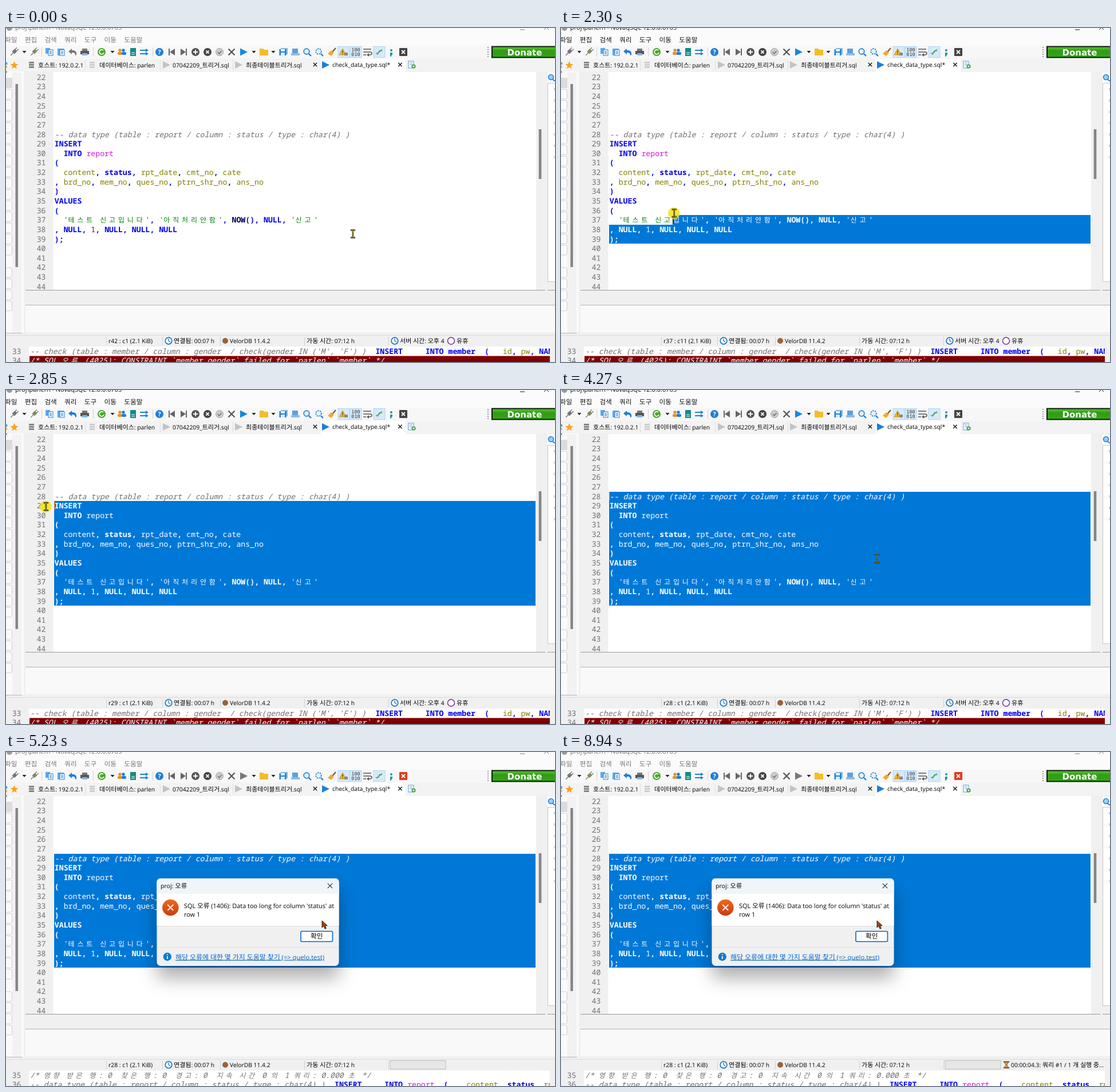
Animation, 959 px wide and 584 px high, one loop 9070 ms. Source, as an HTML page:

```html
<!DOCTYPE html>
<html lang="ko">
<head>
<meta charset="utf-8">
<title>SQL editor</title>
<style>
html, body { margin: 0; width: 100%; height: 100%; overflow: hidden; background: #f0f0f0; }
svg { display: block; width: 100%; height: 100%; }
text { white-space: pre; text-rendering: geometricPrecision; font-family: 'Open Sans', 'Noto Sans CJK KR', sans-serif; }
.code text { font: 13.23px 'Noto Sans Mono', 'Noto Sans CJK KR', monospace; }
.code text.ko { font: 12px 'Noto Sans CJK KR', sans-serif; letter-spacing: 4.84px; }
.code .com { fill: #707070; font-style: italic; }
.code .com.ko { font-style: italic; }
.code .str { fill: #008000; }
.code .kw { fill: #0000f0; font-weight: bold; }
.code .fn { fill: #000060; font-weight: bold; }
.code .tab { fill: #d818e0; }
.code .num { fill: #800080; }
.code .id { fill: #808000; }
.code .sym { fill: #0000f0; font-weight: 600; }
.code.white text { fill: #fff; }
.ko { font-family: 'Noto Sans CJK KR', sans-serif; }
</style>
</head>
<body>
<svg id="stage" viewBox="0 0 959 584" preserveAspectRatio="none"></svg>
<script>
const LOOP = 9070, CELL = 7.94, ROW = 16.63, LEFT = 84.8, TOP = 177.8;
const BLUE = '#1e7fd6', DARK = '#4a4a4a';
const esc = s => s.replace(/&/g, '&amp;').replace(/</g, '&lt;').replace(/>/g, '&gt;');
const isKo = s => /[가-힣]/.test(s);
const split = s => s.match(/[가-힣]+|[^가-힣]+/g) || [];

const rect = (x, y, w, h, fill, more = '') => `<rect x="${x}" y="${y}" width="${w}" height="${h}" fill="${fill}" ${more}/>`;
const circle = (x, y, r, fill, more = '') => `<circle cx="${x}" cy="${y}" r="${r}" fill="${fill}" ${more}/>`;
const fillPath = (d, fill, more = '') => `<path d="${d}" fill="${fill}" ${more}/>`;
const line = (d, color = DARK, w = 1, more = '') => `<path d="${d}" fill="none" stroke="${color}" stroke-width="${w}" ${more}/>`;
const cross = (x, y, r, color, w) => line(`M${x - r} ${y - r}l${2 * r} ${2 * r}m0 ${-2 * r}l${-2 * r} ${2 * r}`, color, w);
const spans = (s, size) => split(s).map(p => isKo(p)
  ? `<tspan class="ko" font-size="${(size * 1.07).toFixed(2)}">${p}</tspan>` : `<tspan>${esc(p)}</tspan>`).join('');
const label = (x, y, s, size = 10.3, more = '') => `<text x="${x}" y="${y}" font-size="${size}" ${more}>${spans(s, size)}</text>`;
const group = (id, body, more = '') => `<g id="${id}" ${more}>${body}</g>`;

// Code text on a fixed grid; Hangul takes two cells
const cells = s => [...s].reduce((n, c) => n + (isKo(c) ? 2 : 1), 0);
const TOKEN = /(--.*? \)(?=  |$)|\/\*.*\*\/)|('[^']*')|(\b(?:INSERT|INTO|VALUES|NULL|NAME|status|member)\b)|(\bNOW\b)|(\breport\b)|(\d+)|(\w+)|([^\w\s'])/g;
const KINDS = ['com', 'str', 'kw', 'fn', 'tab', 'num', 'id', 'sym'];
function codeLine(x, y, s) {
  let out = '';
  for (const m of s.matchAll(TOKEN)) {
    const kind = KINDS[m.slice(1).findIndex(v => v !== undefined)];
    let col = cells(s.slice(0, m.index));
    for (const part of split(m[0])) {
      out += `<text class="${kind}${isKo(part) ? ' ko' : ''}" x="${(x + col * CELL).toFixed(2)}" y="${y}">${esc(part)}</text>`;
      col += cells(part);
    }
  }
  return out;
}

const SQL = [
  '-- data type (table : report / column : status / type : char(4) )',
  'INSERT', '  INTO report', '(',
  '  content, status, rpt_date, cmt_no, cate',
  ', brd_no, mem_no, ques_no, ptrn_shr_no, ans_no',
  ')', 'VALUES', '(',
  "  '테스트 신고입니다', '아직처리안함', NOW(), NULL, '신고'",
  ', NULL, 1, NULL, NULL, NULL', ');'
];
const rowTop = n => TOP + (n - 28) * ROW;
const baseline = n => (rowTop(n) + 12.8).toFixed(2);
const codeBody = SQL.map((s, i) => codeLine(LEFT, baseline(i + 28), s)).join('');

function chrome() {
  let o = rect(0, 0, 959, 584, '#f0f0f0') + rect(0, 0, 959, 31, '#fbfbfb') + rect(0, 31, 959, 23, '#f7f7f7');
  o += group('menu', circle(6, 0, 5, '#9a9a9a') + label(16, 3, 'proj\\parlen\\ - NovaqSQL 12.0.0.6765', 11) +
    line('M898 3h8M940 3l4-4 4 4', 'currentColor') +
    ['파일', '편집', '검색', '쿼리', '도구', '이동', '도움말'].map((s, i) => label(-2 + i * 34.7, 25, s, 10.9)).join(''), 'fill="currentColor"');
  return o + toolbar() + tabs() + panels();
}

function toolbar() {
  const drop = x => fillPath(`M${x - 3.5} 40h7l-3.5 4z`, '#222');
  const plug = (x, c) => `<g transform="translate(${x} 42) rotate(45)">${rect(-3, -5, 6, 7, c, 'rx="1"')}${line('M-2 -5v-4M2 -5v-4M0 2v6', c, 1.5)}</g>`;
  const page = (x, y, c) => rect(x, y, 8, 10, '#fff', `stroke="${c}"`) + line(`M${x + 2} ${y + 3}h4m-4 2h4m-4 2h4`, c);
  const skip = (x, d) => fillPath(`M${x - 5 * d} 36v12l${9 * d} -6z`, '#666', `transform="rotate(180 ${x} 42)"`) + rect(x - 5 * d - 1, 36, 2, 12, '#666');
  const hi = x => rect(x - 10, 32.5, 20, 19, '#d6eafa', 'stroke="#b0d5f3"');
  const lens = (x, more = '') => circle(x - 1, 41, 4.8, '#e4f2fd', `stroke="${BLUE}" stroke-width="1.7" ${more}`) + line(`M${x + 3} 45l4 4`, BLUE, 2.4);
  let o = plug(14, '#70767c') + drop(32) + plug(49, '#7e8a62');
  o += rect(69, 35, 8, 10, '#5aa9ea') + page(74, 38, BLUE) + rect(90, 36, 11, 12, '#5aa9ea') + page(94, 38, BLUE);
  o += group('undo', fillPath('M109 41l6-5v3h3q6 1 5 8l-2 1q0-5-4-5h-2v3z', 'currentColor'));
  o += rect(133, 36, 9, 4, '#777') + rect(130, 40, 15, 6, '#555') + rect(133, 44, 9, 4, '#79b8ee');
  o += circle(167, 42, 7, '#4ca52c') + line('M170 39a4 4 0 1 0 1 4', '#fff', 1.6) + drop(186);
  o += circle(199, 39, 2.7, '#e29330') + rect(195, 42, 8, 5, '#e29330', 'rx="2"') + circle(205, 39, 2.7, BLUE) + rect(202, 42, 8, 5, BLUE, 'rx="2"');
  o += rect(217, 35, 10, 14, '#138c86') + line('M219 43h6m-6 3h6', '#fff') + line('M234 39h12M234 45h12', BLUE, 2) + fillPath('M244 36l5 3-5 3zM244 42l5 3-5 3z', BLUE);
  o += circle(268, 42, 7, BLUE) + label(265.6, 46, '?', 11, 'fill="#fff" font-weight="bold"') + skip(290, 1) + skip(310, -1);
  o += circle(331, 42, 7, '#555') + line('M327 42h8M331 38v8', '#fff', 1.8) + circle(352, 42, 7, '#444') + cross(352, 42, 2.6, '#fff', 1.8);
  o += circle(373, 42, 6.6, '#ccc', 'stroke="#aaa"') + line('M370 42l2.5 3 4-5', '#777', 1.6) + cross(394, 42, 5.5, '#555', 2.3);
  o += group('play', fillPath('M409 35.5v13l13-6.5z', 'currentColor')) + drop(433);
  o += fillPath('M443 36h6l2 2h7v10h-15z', '#f3bd2c') + drop(467);
  o += rect(480, 35, 12, 11, '#7fb8e8') + rect(477.5, 37, 12, 11, BLUE) + rect(480, 37, 7, 4, '#fff') + rect(480, 43, 7, 5, '#d9ecfb');
  o += rect(500, 36, 10, 8, '#5f9fdc') + rect(498, 44, 15, 4, '#8dbce6');
  o += lens(526) + lens(547, 'stroke-dasharray="2.5 1.5"');
  o += line('M576 35l-6 7', '#795038', 2) + fillPath('M568 39l5 4-5 6-6-4z', '#f1a92c');
  o += hi(590) + fillPath('M588 36l6 11h-12z', '#f5b82e', 'stroke="#c99328"') + line('M588 39.5v3.5m0 1.2v1.5', '#333', 1.3) + rect(591, 43, 6, 5, '#888');
  o += hi(611);
  ['100', '010'].forEach((s, i) => o += `<text x="611" y="${41 + i * 8}" text-anchor="middle" style="font:8.5px 'DejaVu Sans Mono',monospace" fill="#333">${s}</text>`);
  o += line('M624 37h14M624 42h12q3 0 3 2.5t-4 2.5h-3M624 47h5', '#555', 1.5) + fillPath('M634 44v6l-4-3z', '#555');
  o += hi(652) + line('M646 44q3 2 5-2t6-2', '#2f9b48', 1.4) + line('M648 47l9-10', '#549b6a', 1.1);
  o += circle(673, 39, 2, '#1595a0') + fillPath('M671 43h4v3l-3 4h-1z', '#1595a0');
  o += group('stop', rect(687, 35, 14, 14, 'currentColor', 'rx="1"') + cross(694, 42, 3, '#fff', 1.8));
  o += line('M62.5 34v16M152.5 34v16M256.5 34v16', '#d2d2d2') + line('M842 33v18', '#999', 2, 'stroke-dasharray="2 2"');
  o += rect(849, 32.5, 116, 19, 'url(#green)', 'stroke="#0a1a06" stroke-width="2"');
  return o + `<text x="906" y="47.5" text-anchor="middle" fill="#fff" style="font:bold 15px 'DejaVu Sans',sans-serif">Donate</text>`;
}

function tabs() {
  const stack = (x, c) => [0, 4, 8].map(d => rect(x - 4, 59 + d, 9, 3, c)).join('');
  const run = (x, c) => fillPath(`M${x - 6} 58v13l13-6.5z`, c);
  const seps = [138, 269, 396].map(x => `M${x}.5 56v18`).join('');
  let o = rect(0, 54, 959, 22, '#f3f3f3') + rect(550, 54, 148, 23, '#fff') + line(seps, '#dedede');
  o += fillPath('M14.5 58l2 4.8 5 .4-4 3.2 1.3 5-4.3-2.8-4.3 2.8 1.3-5-4-3.2 5-.4z', '#f9a21b') + circle(0, 62, 2.5, '#4aa6df') + circle(0, 68, 2, '#f9a21b');
  o += stack(44, '#858585') + label(56, 69, '호스트: 192.0.2.1') + stack(150, '#cdcdcd') + label(163, 69, '데이터베이스: parlen');
  o += run(280, '#c3c3c3') + label(291, 69, '07042209_트리거.sql') + run(406, '#c3c3c3') + label(419, 69, '최종테이블트리거.sql');
  o += cross(540, 64, 3.2, '#111', 1.3) + run(558, BLUE) + label(570, 68, 'check_data_type.sql*') + cross(688.5, 64, 3.2, '#111', 1.3);
  return o + rect(703, 58, 9, 12, '#fff', 'stroke="#5a9ed0"') + line('M705 61h5m-5 3h5', '#5a9ed0') + circle(712, 67, 3.6, '#43a047') + line('M710 67h4m-2-2v4', '#fff');
}

function panels() {
  const box = y => rect(-4, y, 14.5, 17, '#fafafa', 'rx="2.5" stroke="#d0d0d0"');
  let o = rect(0, 76, 31, 457, '#fafafa') + rect(11, 78, 16, 455, '#f2f2f2') + rect(0, 87, 11, 18, '#dcdcdc') + cross(0, 77, 1.5, '#333', 1);
  for (let i = 0; i < 15; i++) o += box(107 + i * 19.5);
  for (let i = 0; i < 4; i++) o += box(419 + i * 19.5);
  o += rect(16.5, 98, 4.5, 320, '#858585') + line('M0 533.5h28', '#b5b5b5');
  o += rect(34, 77, 908, 382, '#fff') + rect(34, 77, 48.5, 382, '#f0f0f0') + rect(926, 77, 16, 382, '#f0f0f0') + rect(930.7, 177, 4.6, 87, '#858585');
  o += '<g class="code" fill="#707070">';
  for (let n = 22; n < 45; n++) o += `<text x="69.5" y="${baseline(n)}" text-anchor="end">${n}</text>`;
  o += '</g>' + line('M34 458.5h908', '#9a9a9a') + line('M34 484.5h925', '#b0b0b0') + rect(34, 485, 925, 47, '#f9f9f9');
  o += rect(946, 78, 13, 365, '#fff') + line('M946.5 443V96.5h13M946 443.5h13', '#c4c4c4') + line('M946 458.5h13', '#9a9a9a');
  o += circle(952, 86, 4.5, '#9ccdf5', `stroke="${BLUE}" stroke-width="1.6"`) + line('M955 90l4 3', BLUE, 2);
  for (let i = 0; i < 7; i++) o += line(`M957 ${105 + i * 19.8}l2 2-2 2`, '#999');
  return o;
}

function statusBar() {
  const clock = x => circle(x, 547, 5.8, '#fff', 'stroke="#1a76b8" stroke-width="1.7"') + line(`M${x} 543v4l3 2`, '#1a76b8', 1.3);
  let o = rect(0, 537, 959, 20, '#f0f0f0') + line('M0 537.5h959', '#dcdcdc') + line([175, 273, 374, 521, 668].map(x => `M${x}.5 540v15`).join(''), '#d0d0d0');
  o += `<text id="pos" x="179" y="551" font-size="10.4"></text>`;
  o += clock(284) + label(293, 551, '연결됨: 00:07 h') + circle(383, 547, 5, '#9a6238') + label(391, 551, 'VelorDB 11.4.2') + label(525, 551, '가동 시간: 07:12 h');
  o += group('idle', clock(679) + label(688, 551, '서버 시간: 오후 4', 10.3, 'clip-path="url(#cut)"') +
    circle(777.5, 547, 6, '#fff', 'stroke="#74309a" stroke-width="1.5"') + label(787, 551, '유휴'));
  o += group('busy', rect(671, 539.5, 97, 15, '#e6e6e6', 'stroke="#bcbcbc"'));
  return o + group('timer', fillPath('M774 542h8l-3.3 5 3.3 5h-8l3.3-5z', '#d7a254', 'stroke="#704a26"') +
    line('M772.5 541.5h11M772.5 552.5h11', '#704a26', 1.6) + '<text id="clock" x="786" y="551" font-size="10.3"></text>');
}

function logPane() {
  const y1 = 569.5, y2 = 586;
  const nums = n => [y1, y2].map((y, i) => `<text x="26.5" y="${y}" text-anchor="end" fill="#707070">${n + i}</text>`).join('');
  const before = nums(33) + codeLine(42, y1, "-- check (table : member / column : gender  / check(gender IN ('M', 'F') )  INSERT     INTO member  (   id, pw, NAME") +
    rect(41, 573.5, 909, 11, '#800000') + `<g class="code white">${codeLine(42, y2, '/* SQL 오류 (4025): CONSTRAINT `member_gender` failed for `parlen`.`member` */')}</g>`;
  const after = nums(35) + codeLine(42, y1, '/* 영향 받은 행: 0  찾은 행: 0  경고: 0  지속 시간 0 의 1 쿼리: 0.000 초 */') +
    codeLine(42, y2, SQL[0] + '  INSERT     INTO report  (    content, status, rpt_date');
  return rect(0, 557, 959, 27, '#fff') + rect(0, 557, 40, 27, '#f0f0f0') +
    `<g class="code">${group('before', before)}${group('after', after)}</g>` + rect(950, 557, 9, 27, '#f0f0f0');
}

function dialog() {
  let o = rect(263.5, 221, 318, 153, '#f0f0f0', 'rx="7" filter="url(#shadow)"') + fillPath('M263.5 304V228q0-7 7-7h304q7 0 7 7v76z', '#fff');
  o += fillPath('M263.5 248V228q0-7 7-7h304q7 0 7 7v20z', '#f1f5fa') + line('M264 304.5h317M264 341.5h317', '#dedede');
  o += label(270, 238, 'proj: 오류', 10.6) + cross(566, 234, 4.2, '#222', 1.1);
  o += circle(287.3, 272, 14.3, 'url(#err)') + cross(287.3, 272, 5, '#fff', 1.8);
  o += label(311, 273, "SQL 오류 (1406): Data too long for column 'status' at", 10.9) + label(311, 288, 'row 1', 10.9);
  o += rect(515, 313.5, 55.5, 18, '#fdfdfd', 'rx="2" stroke="#0067c0" stroke-width="1.6"') + label(542.7, 326, '확인', 10.9, 'text-anchor="middle"');
  o += circle(281.8, 358, 7.2, '#0f7ad1') + line('M281.8 357v5M281.8 353.5v1.8', '#fff', 1.7);
  return o + label(296, 362.5, '해당 오류에 대한 몇 가지 도움말 찾기 (=> quelo.test)', 11.2, 'fill="#0066cc" text-decoration="underline"');
}

const stage = document.getElementById('stage');
stage.innerHTML = `<defs>
  <linearGradient id="green" x2="0" y2="1"><stop stop-color="#5fc53b"/><stop offset=".4" stop-color="#2f9c12"/><stop offset="1" stop-color="#36a518"/></linearGradient>
  <linearGradient id="err" x2="0" y2="1"><stop stop-color="#ee6a1e"/><stop offset="1" stop-color="#cb3a0c"/></linearGradient>
  <filter id="shadow" x="-25%" y="-35%" width="150%" height="210%"><feDropShadow dx="0" dy="21" stdDeviation="16" flood-opacity=".32"/></filter>
  <clipPath id="cut"><rect x="680" y="538" width="88" height="18"/></clipPath>
  <clipPath id="sel"><rect id="c0"/><rect id="c1"/></clipPath></defs>` +
  chrome() + `<g class="code">${codeBody}</g><g fill="#0078d7" shape-rendering="crispEdges"><rect id="s0"/><rect id="s1"/></g>` +
  `<g class="code white" clip-path="url(#sel)">${codeBody}</g>` + rect(0, 0, 1.4, 15, '#000', 'id="caret"') +
  statusBar() + logPane() + group('dialog', dialog()) +
  group('mouse', circle(-.5, 0, 10.3, '#f4e414', 'id="halo" opacity=".85"') +
    group('beam', line('M-4 -6.5h3l1 1 1 -1h3M0 -6v12M-4 6.5h3l1 -1 1 1h3', '#111', 2.5) + line('M-3.2 -6.5h2.2l1 1 1 -1h2.2M0 -6v12M-3.2 6.5h2.2l1 -1 1 1h2.2', '#d2c418', 1)) +
    group('arrow', fillPath('M0 0v12l2.9-2.7 2.3 5 2.2-1-2.2-4.8h4z', '#a8400c', 'stroke="#2c1206" stroke-width=".9"')));

const el = {};
stage.querySelectorAll('[id]').forEach(n => el[n.id] = n);
const show = (id, on) => el[id].style.display = on ? '' : 'none';
const tint = (id, c) => el[id].style.color = c;
const attrs = (id, a) => { for (const k in a) el[id].setAttribute(k, a[k]); };
const write = (id, s, size) => { if (el[id].dataset.s !== s) { el[id].dataset.s = s; el[id].innerHTML = spans(s, size); } };

// time, x, y, eased
const PATH = [
  [0, 606, 360], [870, 606, 360], [1550, 276, 391, 1], [1950, 276, 391], [2200, 198, 342], [2300, 198, 324],
  [2770, 70, 204], [2850, 70, 204], [2910, 64, 188], [3030, 64, 188], [3740, 552, 295, 1], [LOOP, 552, 295]
];
function mouseAt(t) {
  const i = PATH.findIndex(p => p[0] > t), a = PATH[i - 1], b = PATH[i];
  let k = (t - a[0]) / (b[0] - a[0]);
  if (b[3]) k = k * k * (3 - 2 * k);
  return [a[1] + (b[1] - a[1]) * k, a[2] + (b[2] - a[2]) * k];
}

function caretAt(t) {
  if (t < 1750) return { row: 42, col: 0, at: 1 };
  if (t < 1950) return { row: 40, col: 0, at: 1 };
  const [x, y] = t < 3000 ? mouseAt(t - 60) : [64, 188];
  const row = Math.min(40, 28 + Math.floor((y - TOP) / ROW)), text = SQL[row - 28] || '';
  const want = (x - LEFT) / CELL;
  let best = 0, col = 0;
  for (let i = 1; i <= text.length; i++) {
    const c = cells(text.slice(0, i));
    if (Math.abs(c - want) < Math.abs(col - want)) { best = i; col = c; }
  }
  return { row, col, at: best + 1 + isKo(text.slice(0, best)) };
}

function draw(t) {
  const focus = t >= 1750 && t < 4640, run = t >= 4600;
  tint('menu', focus ? '#111' : '#777');
  tint('undo', t < 1750 ? '#777' : BLUE);
  tint('play', run ? '#777' : '#1488e0');
  tint('stop', run ? '#e23a20' : '#444');
  for (const id of ['idle', 'before']) show(id, !run);
  for (const id of ['busy', 'after']) show(id, run);

  const { row, col, at } = caretAt(t), x = LEFT + col * CELL, y = rowTop(row);
  write('pos', `r${row} : c${at} (2.1 KiB)`, 10.4);
  const rest = Math.max(0, rowTop(40) - y - ROW);
  for (const p of 'sc') {
    attrs(p + 0, { x: x - .5, y, width: 925.5 - x, height: row < 40 ? ROW : 0 });
    attrs(p + 1, { x: LEFT - .5, y: y + ROW, width: 925.5 - LEFT, height: rest });
  }
  attrs('caret', { x: x - .9, y, fill: row < 40 && col === 0 ? '#f07a28' : '#111' });
  show('caret', focus && (t < 3210 || Math.floor((t - 3210) / 530) % 2 === 0));

  const grow = Math.min(1, Math.max(0, (t - 4670) / 180)), ease = 1 - (1 - grow) ** 3, scale = .92 + .08 * ease;
  show('dialog', grow > 0);
  attrs('dialog', { opacity: ease, transform: `translate(422.5 298) scale(${scale}) translate(-422.5 -298)` });

  show('timer', t >= 5500);
  const tenths = Math.max(0, Math.floor((t - 4635) / 100));
  write('clock', `00:00:0${(tenths / 10).toFixed(1)}: 쿼리 #1 / 1 개 실행 중...`, 10.3);

  const [mx, my] = mouseAt(t);
  attrs('mouse', { transform: `translate(${mx} ${my})` });
  show('halo', t >= 1750 && t < 3030);
  show('beam', !run);
  show('arrow', run);
}

function tick() {
  draw(performance.now() % LOOP);
  requestAnimationFrame(tick);
}
tick();
</script>
</body>
</html>
```
